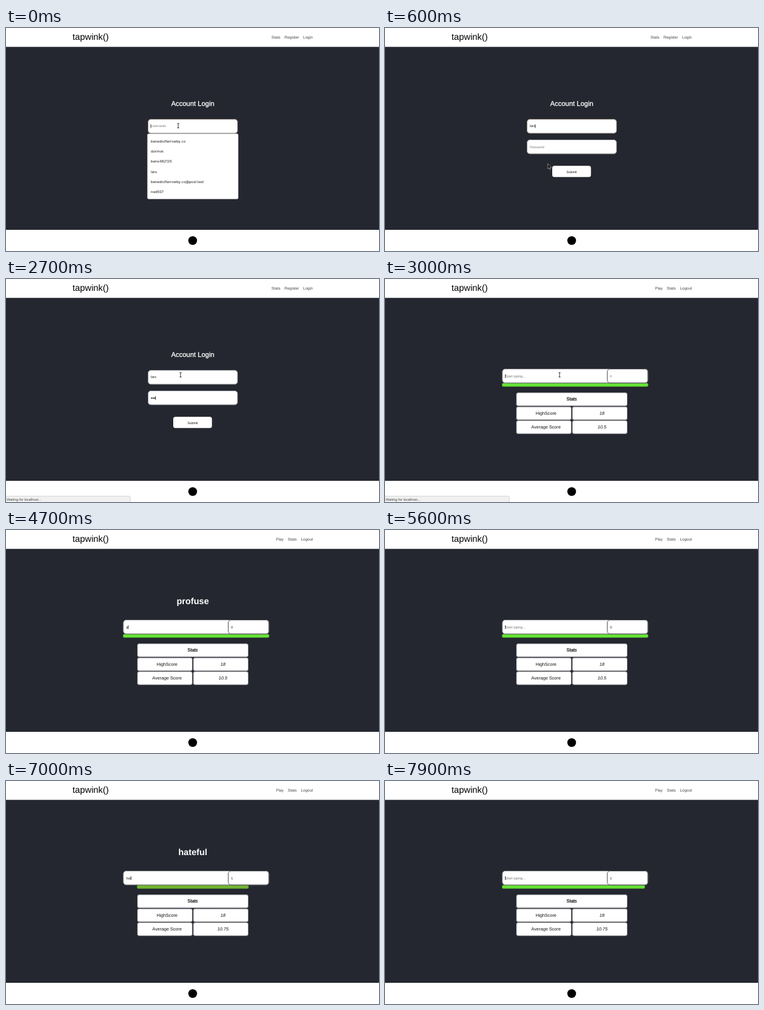
Write an HTML page that moves like this. It is 600x358 px and loops after 8 s.

```html
<!DOCTYPE html>
<html lang="en">
<head>
<meta charset="utf-8">
<title>Typing game</title>
<style>
html, body { margin: 0; width: 100%; height: 100%; overflow: hidden; background: #fff; }
svg { display: block; width: 600px; height: 358px; font-family: "Liberation Sans", Arial, sans-serif; text-rendering: geometricPrecision; }
</style>
</head>
<body>
<svg id="stage" viewBox="0 0 600 358"></svg>
<script>
const LOOP = 8000, STEP = 100;
const stage = document.getElementById('stage');
const pen = document.createElement('canvas').getContext('2d');
pen.font = '54px "Liberation Sans", Arial, sans-serif';
const widthOf = s => pen.measureText(s).width / 10;

const rect = (x, y, w, h, fill, more = '') =>
  `<rect x="${x}" y="${y}" width="${w}" height="${h}" fill="${fill}" ${more}/>`;
const text = (x, y, size, s, fill = '#111', more = '') =>
  `<text x="${x}" y="${y}" font-size="${size}" fill="${fill}" ${more}>${s}</text>`;
const mid = 'text-anchor="middle"';
const box = (x, y, w, h, r = 4.5, line = '#85858a') =>
  rect(x + .5, y + .5, w - 1, h - 1, '#fff', `rx="${r}" stroke="${line}"`);
const caret = (x, y) => rect(x - .3, y - 3, .7, 6, '#000');
const ibeam = (x, y) =>
  `<path d="M${x - 1.6} ${y - 3.5}h3.2M${x} ${y - 3.5}v7M${x - 1.6} ${y + 3.5}h3.2" stroke="#222" stroke-width=".9"/>`;
const arrow = (x, y) =>
  `<path d="M${x} ${y}v8l1.9-1.7 1.3 2.9 1.2-.6-1.3-2.7h2.6z" fill="#000" stroke="#fff" stroke-width=".5"/>`;

// Text in a field: placeholder when empty, caret after the typed part
function entry(x, y, value, hint, size, on) {
  return (value ? text(x, y + 1.9, 5.4, value) : text(x, y + 1.9, size, hint, '#757575')) +
    (on ? caret(x + widthOf(value), y) : '');
}

function frame(links) {
  return rect(0, 0, 600, 358, '#fff') + rect(0, 30.3, 600, 293.7, '#24272f') +
    text(107, 18.9, 14.4, 'tapwink()', '#000') +
    links.map(([x, s]) => text(x, 16.8, 6.3, s, '#444')).join('') +
    '<circle cx="300.3" cy="341.2" r="7" fill="#000"/>';
}

function suggestions(t) {
  const names = ['benedictfarrowby.co', 'dorinvk', 'beno462135', 'lars',
    'benedictfarrowby.co@post.test', 'ned507'];
  const hover = t < 300 ? -1 : t < 400 ? 1 : 3;
  return rect(227.5, 169.8, 146, 104.7, '#fff', 'rx="2" stroke="#c9c9cc" stroke-width=".5"') +
    names.map((s, i) => {
      const y = 182 + 16.2 * i;
      return (i === hover ? rect(228, y - 8, 145, 16.2, '#e6e6e8') : '') +
        text(233, y + 2, 5.75, s, '#1a1a1a', 'font-family="Inter, sans-serif"');
    }).join('');
}

function login(t) {
  const user = t < 400 ? '' : 'lars';
  const dots = t < 1300 ? 0 : Math.min(3, 1 + Math.floor((t - 1300) / 200));
  const second = t >= 1100, blink = t >= 2200 && t < 2700;
  let s = frame([[427, 'Stats'], [448, 'Register'], [478, 'Login']]) +
    text(300.4, 124.8, 10.95, 'Account Login', '#fff', mid + ' stroke="#fff" stroke-width=".3"') +
    box(228, 146, 145, 23.5, 4.5, second ? '#85858a' : '#8a8078') +
    entry(233, 157.5, user, 'Username', 5.25, !second) +
    box(228, 179, 145, 23.5, 4.5, second ? '#777a88' : '#85858a') +
    rect(269, 221.3, 62.3, 18, '#fff', 'rx="3.5"') + text(300.2, 232.5, 5.35, 'Submit', '#111', mid);
  if (dots) {
    for (let i = 0; i < dots; i++) s += `<circle cx="${234.2 + 2.5 * i}" cy="191.2" r="1.05" fill="#111"/>`;
    if (!blink) s += caret(233 + 2.5 * dots, 191);
  } else s += entry(233, 191, '', 'Password', 5.25, second);
  if (t < 600) s += suggestions(t);
  if (t < 300) s += ibeam(277, 156.8);
  else if (t < 1100) s += t < 400 ? arrow(268, 194) : arrow(262, 218);
  if (t >= 2300) s += status() + ibeam(t < 2400 ? 272 : 280.8, t < 2400 ? 176 : t < 2500 ? 160 : 153.8);
  return s;
}

const status = () =>
  rect(-1, 348.7, 201, 11, '#f1f1f2', 'rx="1.5" stroke="#c4c4c6" stroke-width=".7"') +
  text(1, 355.6, 5.7, 'Waiting for localhost...', '#444');

// The time bar keeps its left edge while wider than the page column, then shrinks about the centre
function timeBar(t) {
  const start = [7800, 5950, 5600, 4700].find(a => t >= a) ?? t;
  const gone = Math.max(0, t - start) * .053;
  const w = 235 - gone, k = gone / 235;
  const x = Math.max(188.3, 300.5 - w / 2);
  const mix = (a, b) => Math.round(a + (b - a) * k);
  return rect(x, 167.3, w, 5.4, `rgb(${mix(101, 158)},${mix(228, 30)},${mix(54, 30)})`,
    'rx="2.2" stroke="#4c9a30" stroke-width=".5"');
}

function play(t) {
  const first = t < 5600;
  const word = t < 3500 ? '' : first ? 'profuse' : t >= 5900 && t < 7800 ? 'hateful' : '';
  const count = first ? Math.floor((t - 4700) / 130) + 1 : Math.floor((t - 6500) / 200) + 1;
  const typed = word.slice(0, Math.max(0, count));
  const scored = t >= 5900, on = t < 4000 || t >= 4400;
  const cell = (x, y, w) => box(x, y, w, 21.8, 2.5, '#9a9a9e');
  const row = (y, name, value) => cell(211, y, 89) + cell(301, y, 89) +
    text(259, y + 13.1, 7.2, name, '#111', mid) +
    text(349, y + 13.1, 7.2, value, '#111', mid + ' font-style="italic"');
  return frame([[434.3, 'Play'], [453.2, 'Stats'], [474.5, 'Logout']]) +
    text(300.4, 118.6, 14.2, word, '#fff', mid + ' font-weight="bold"') +
    timeBar(t) +
    box(188.3, 144, 235, 23.3) + box(357, 144, 66.3, 23.3, 4.5, '#55555a') +
    entry(193.5, 156, typed, 'Start typing...', 5.5, on) +
    text(362, 158, 5.4, scored ? 1 : 0, t < 3500 ? '#757575' : '#111') +
    cell(211, 182.2, 179) + text(300.4, 195.4, 7.4, 'Stats', '#111', mid + ' stroke="#111" stroke-width=".2"') +
    row(204.7, 'HighScore', 18) + row(227, 'Average Score', scored ? 10.75 : 10.5) +
    (t < 3300 ? status() : '') +
    (t < 3500 ? ibeam(280.8, t < 3400 ? 153.8 : 157) : '');
}

let shown = -1;
function tick() {
  const t = Math.floor(performance.now() % LOOP / STEP) * STEP;
  if (t !== shown) {
    shown = t;
    stage.innerHTML = t < 3000 ? login(t) : play(t);
  }
  requestAnimationFrame(tick);
}
tick();
</script>
</body>
</html>
```
